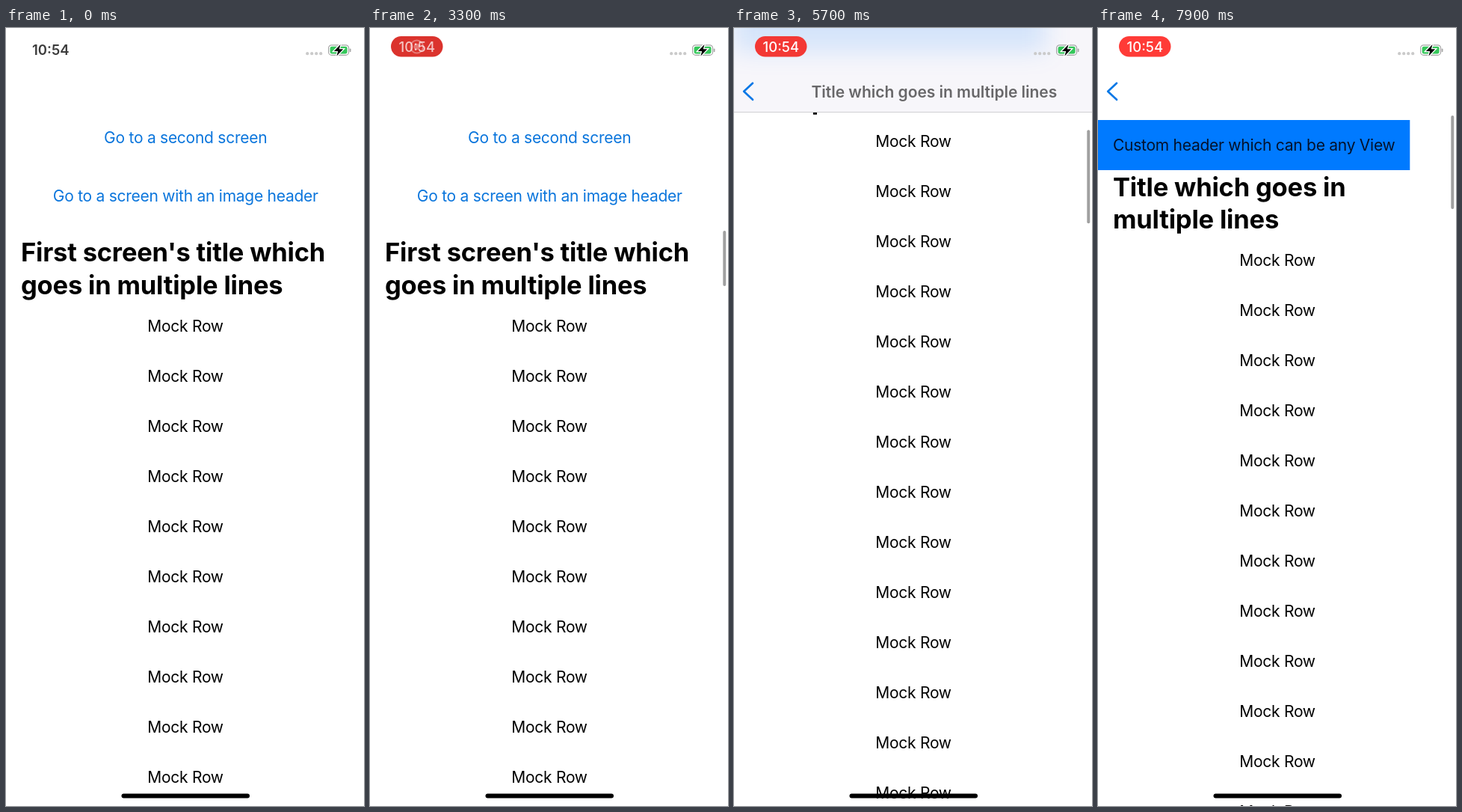
These frames come from a looping animation (479x1040 px, 8 s). An HTML page with a canvas:

```html
<!DOCTYPE html>
<html lang="en">
<head>
<meta charset="utf-8">
<title>Scrolling headers</title>
<style>
  html, body { margin: 0; width: 100%; height: 100%; overflow: hidden; background: #fff; }
  canvas { display: block; width: 100%; height: 100%; }
</style>
</head>
<body>
<canvas id="stage"></canvas>
<script>
const W = 479, H = 1040, LOOP = 8000;
const BLUE = '#007aff', LINK = '#0a75dc', ROW = 67;
const canvas = document.getElementById('stage');
const ctx = canvas.getContext('2d');
const dpr = window.devicePixelRatio || 1;
canvas.width = W * dpr;
canvas.height = H * dpr;

const STYLES = {
  body: { font: '400 21px Inter, sans-serif', gap: '-0.26px' },
  large: { font: '700 34.5px Inter, sans-serif', gap: '-0.19px' },
  nav: { font: '600 21px Inter, sans-serif', gap: '-0.03px' },
  clock: { font: '600 18.5px Inter, sans-serif', gap: '0px' },
  pill: { font: '500 18.5px Inter, sans-serif', gap: '0px' }
};

// Scroll offsets as [time, offset]
const FIRST = [[680, 0], [1200, 89], [1900, 117], [2480, 117], [3150, 0]];
const SECOND = [[5050, 0], [5350, 40], [5900, 215], [6400, 264], [6700, 264], [7200, 110], [7700, 0]];

const clamp = x => Math.min(1, Math.max(0, x));
const ramp = (x, a, b) => clamp((x - a) / (b - a));
const smooth = x => x * x * (3 - 2 * x);

// Monotone cubic interpolation
function curve(keys, t) {
  const last = keys.length - 1;
  if (t <= keys[0][0]) return keys[0][1];
  if (t >= keys[last][0]) return keys[last][1];
  const slope = i => (keys[i + 1][1] - keys[i][1]) / (keys[i + 1][0] - keys[i][0]);
  const tangent = i => {
    if (i === 0 || i === last) return 0;
    const a = slope(i - 1), b = slope(i);
    return a * b <= 0 ? 0 : 2 * a * b / (a + b);
  };
  let i = 0;
  while (t > keys[i + 1][0]) i++;
  const d = keys[i + 1][0] - keys[i][0], u = (t - keys[i][0]) / d, v = 1 - u;
  return keys[i][1] * (1 + 2 * u) * v * v + keys[i + 1][1] * u * u * (3 - 2 * u)
    + d * u * v * (tangent(i) * v - tangent(i + 1) * u);
}

function text(str, x, y, style, color = '#000', align = 'left') {
  ctx.font = STYLES[style].font;
  ctx.letterSpacing = STYLES[style].gap;
  ctx.textAlign = align;
  ctx.fillStyle = color;
  ctx.fillText(str, x, y);
}

function pill(x, y, w, h, color) {
  ctx.fillStyle = color;
  ctx.beginPath();
  ctx.roundRect(x, y, w, h, Math.min(w, h) / 2);
  ctx.fill();
}

function disc(x, y, r, color) {
  ctx.fillStyle = color;
  ctx.beginPath();
  ctx.arc(x, y, r, 0, 7);
  ctx.fill();
}

function layer(alpha, draw) {
  if (alpha <= 0) return;
  ctx.save();
  ctx.globalAlpha *= alpha;
  draw();
  ctx.restore();
}

function clipped(y, h, draw) {
  ctx.save();
  ctx.beginPath();
  ctx.rect(0, y, W, h);
  ctx.clip();
  draw();
  ctx.restore();
}

function rows(first) {
  for (let y = first; y < H + 20; y += ROW) text('Mock Row', 240, y, 'body', '#000', 'center');
}

function scrollbar(y, len, alpha) {
  layer(alpha, () => pill(472.3, y, 4, len, '#a0a0a0'));
}

function page() {
  ctx.fillStyle = '#fff';
  ctx.fillRect(0, 0, W, H);
}

function firstScreen(t) {
  const off = curve(FIRST, t);
  page();
  layer(smooth(ramp(off, 98, 114)), () =>
    text("First screen's title which goes in multiple...", 240, 92.5, 'nav', '#000', 'center'));
  const press = ramp(t, 3420, 3460) * (1 - ramp(t, 3560, 3800));
  layer(1 - 0.7 * press, () => text('Go to a second screen', 240.2, 154.3, 'body', LINK, 'center'));
  text('Go to a screen with an image header', 240.2, 231.5, 'body', LINK, 'center');
  clipped(267, H - 267, () => {
    text("First screen's title which", 20, 311.8 - off, 'large');
    text('goes in multiple lines', 20, 355.6 - off, 'large');
    rows(405.7 - off);
    scrollbar(271 + off * 12 / 117, 74, ramp(t, 680, 780) * (1 - ramp(t, 3380, 3620)));
  });
}

function secondScreen(t) {
  const off = curve(SECOND, t);
  page();
  const header = () => {
    ctx.fillStyle = BLUE;
    ctx.fillRect(0, 123 - off, 417.3, 67);
  };
  clipped(113, H - 113, () => {
    header();
    text('Custom header which can be any View', 20, 164.3 - off, 'body', '#04122c');
    text('Title which goes in', 20, 224.5 - off, 'large');
    text('multiple lines', 20, 268.3 - off, 'large');
    rows(318.4 - off);
    scrollbar(117 + off * 32 / 264, 125, ramp(t, 5050, 5150));
  });
  layer(smooth(ramp(off, 10, 45)), () => clipped(0, 113, () => {
    ctx.fillStyle = '#f7f6fa';
    ctx.fillRect(0, 0, W, 113);
    ctx.save();
    ctx.filter = 'blur(16px)';
    ctx.globalAlpha *= 0.14;
    header();
    ctx.restore();
    ctx.fillStyle = '#cfcfd3';
    ctx.fillRect(0, 112, W, 1);
  }));
  layer(smooth(ramp(off, 140, 175)), () =>
    text('Title which goes in multiple lines', 103.5, 92.5, 'nav'));
  ctx.strokeStyle = '#0a78e6';
  ctx.lineWidth = 2.7;
  ctx.lineCap = ctx.lineJoin = 'round';
  ctx.beginPath();
  ctx.moveTo(25, 73.8);
  ctx.lineTo(13.2, 84.8);
  ctx.lineTo(25, 95.8);
  ctx.stroke();
}

function battery() {
  ctx.strokeStyle = '#a6a6a6';
  ctx.lineWidth = 1.2;
  ctx.beginPath();
  ctx.roundRect(431.6, 22.8, 27, 13.6, 4.2);
  ctx.stroke();
  ctx.fillStyle = '#35c75a';
  ctx.beginPath();
  ctx.roundRect(433.6, 24.8, 23, 9.6, 2.4);
  ctx.fill();
  pill(459.8, 27.4, 1.7, 4.6, '#a6a6a6');
  ctx.beginPath();
  [[447.5, 22], [438.8, 31], [444.2, 31], [442.4, 37.4], [451.2, 28.2], [445.8, 28.2]]
    .forEach(([x, y]) => ctx.lineTo(x, y));
  ctx.closePath();
  ctx.strokeStyle = '#fff';
  ctx.lineWidth = 2.6;
  ctx.stroke();
  ctx.fillStyle = '#000';
  ctx.fill();
}

function statusBar(t) {
  const shown = smooth(ramp(t, 50, 480));
  layer(1 - shown, () => text('10:54', 35, 36.3, 'clock', '#3c3c3c'));
  layer(shown, () => {
    const glow = Math.cos((t - 2400) / 1833 * Math.PI * 2);
    pill(28, 11, 69.5, 27.5, `rgb(${237 + 18 * glow},${55 + 4 * glow},${50 + 5 * glow})`);
    layer(1 - smooth(ramp(t, 3080, 3440)), () => {
      ctx.strokeStyle = '#fff';
      ctx.lineWidth = 2;
      ctx.beginPath();
      ctx.arc(62.7, 25, 8.4, 0, 7);
      ctx.stroke();
      disc(62.7, 25, 4.3, '#fff');
    });
    layer(smooth(ramp(t, 3080, 3420)), () => text('10:54', 62.8, 31.6, 'pill', '#fff', 'center'));
  });
  for (let i = 0; i < 4; i++) disc(403.2 + i * 6, 34.2, 2.1, '#cacaca');
  battery();
}

function render(t) {
  ctx.setTransform(canvas.width / W, 0, 0, canvas.height / H, 0, 0);
  const push = 1 - Math.pow(1 - ramp(t, 3580, 4160), 3);
  if (push < 1) {
    ctx.save();
    ctx.translate(-0.3 * W * push, 0);
    firstScreen(t);
    ctx.restore();
  }
  if (push > 0) {
    ctx.fillStyle = `rgba(0,0,0,${0.1 * push})`;
    ctx.fillRect(0, 0, W, H);
    ctx.save();
    ctx.translate(W * (1 - push), 0);
    secondScreen(t);
    ctx.restore();
  }
  statusBar(t);
  pill(154.5, 1023.4, 171.5, 6, '#000');
}

const start = performance.now();
function tick() {
  render((performance.now() - start) % LOOP);
  requestAnimationFrame(tick);
}
tick();
</script>
</body>
</html>
```
